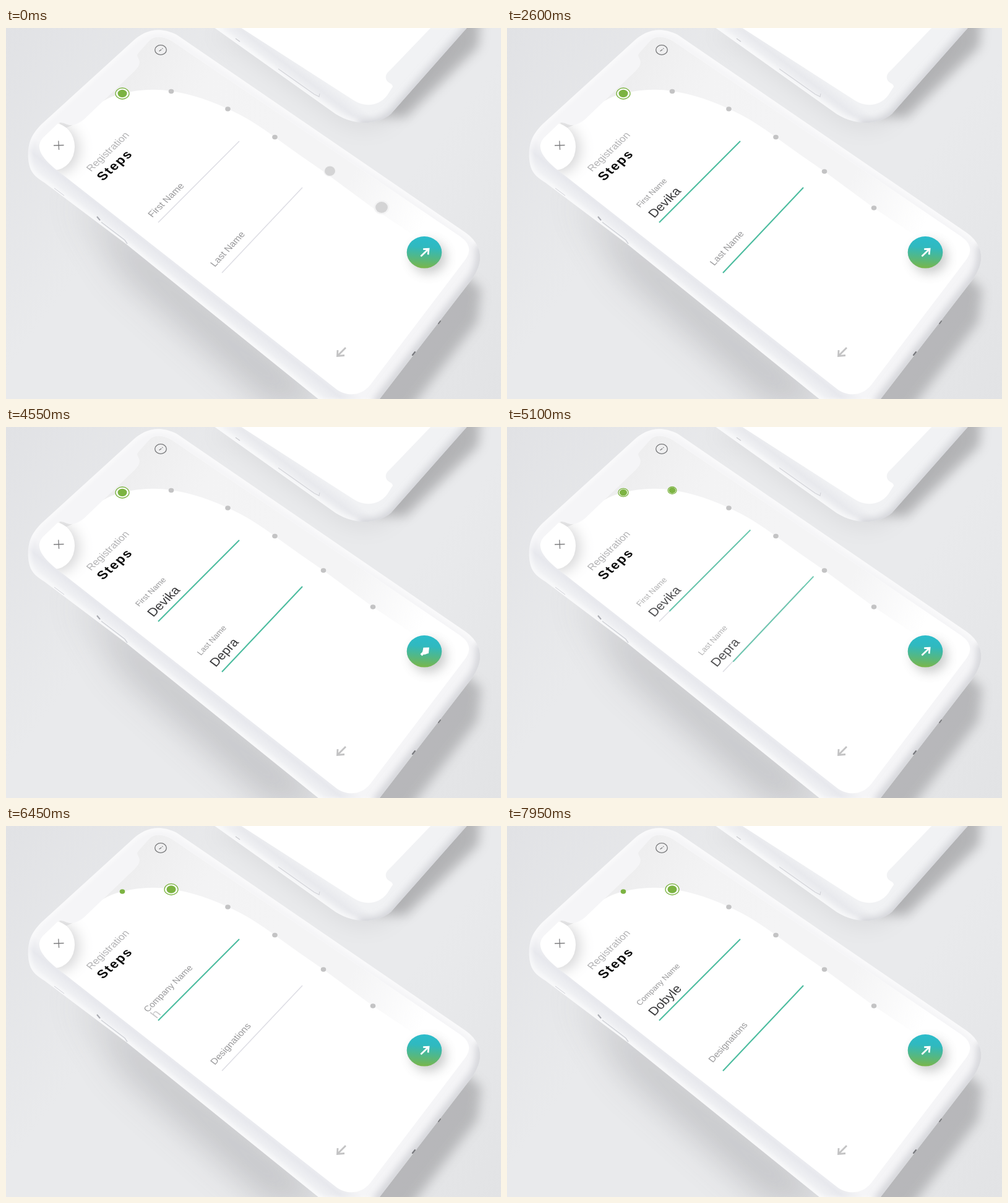
Write an HTML page with a canvas that moves like this. It is 800 px wide and 600 px high and loops after 8000 ms.

```html
<!DOCTYPE html>
<html lang="en">
<head>
<meta charset="utf-8">
<title>Registration steps</title>
<style>
html, body { margin: 0; width: 100%; height: 100%; overflow: hidden; background: #e6e7e9; }
canvas { display: block; }
</style>
</head>
<body>
<canvas id="stage" width="800" height="600"></canvas>
<script>
const LOOP = 8000, STEP = 50;
const GREEN = '#7cb342', TEAL = '#4bbd9f', GREY = '#c3c3c4';
const SANS = '"Liberation Sans", Arial, sans-serif';
const ctx = document.getElementById('stage').getContext('2d');

const clamp = x => Math.max(0, Math.min(1, x));
const ramp = (t, from, to) => clamp((t - from) / (to - from));
const ease = p => p * p * (3 - 2 * p);
const mix = (a, b, p) => a + (b - a) * p;

const body = new Path2D(`M36 212 C34 184 43 171 57 156 L203 23 C224 3 247 -3 276 11
  L737 327 C772 349 773 377 754 405 L600 605 L511 605 L195 350 L62 250 C47 240 38 234 36 212Z`);
const screen = new Path2D(`M214 40 L232 20 C240 12 255 13 268 21 L735 338 C750 348 752 362 742 375
  L588 578 C575 594 553 597 535 585 L85 232 C52 207 48 190 60 177 L83 155 C90 150 96 156 103 157
  C112 158 122 152 130 144 L205 72 C214 64 217 58 215 52 C213 47 210 44 214 40Z`);
const band = new Path2D(`M95 162 C125 155 140 116 188 106 C215 99 242 98 267 102 C300 107 332 118 359 131
  C386 143 411 159 435 177 C461 196 487 214 513 232 L593 291 L660 336 L740 338 L260 0 L60 130Z`);
const backBody = new Path2D(`M329 -6 L527 135 C556 157 596 160 622 139 L750 -6Z`);
const backScreen = new Path2D(`M371 -6 L562 117 C581 129 603 126 616 109 L625 95 C625 89 616 90 614 82
  C613 76 616 72 621 68 L692 -6Z`);

function gradient(c, x0, y0, x1, y1, ...colors) {
  const g = c.createLinearGradient(x0, y0, x1, y1);
  colors.forEach((col, i) => g.addColorStop(i / (colors.length - 1), col));
  return g;
}

// Paints only the blurred shadow of a path, filled or stroked.
function soft(c, path, color, blur, dx = 0, dy = 0, line = 0) {
  c.save();
  c.shadowColor = color;
  c.shadowBlur = blur;
  c.shadowOffsetX = 2000 + dx;
  c.shadowOffsetY = dy;
  c.translate(-2000, 0);
  c.lineWidth = line;
  line ? c.stroke(path) : c.fill(path);
  c.restore();
}

function stroke(c, points, color, width, cap = 'butt') {
  c.beginPath();
  points.forEach(([x, y]) => c.lineTo(x, y));
  c.strokeStyle = color;
  c.lineWidth = width;
  c.lineCap = cap;
  c.stroke();
}

function oval(c, x, y, rx, ry, color, line = 0) {
  c.beginPath();
  c.ellipse(x, y, rx, ry, 0, 0, 7);
  c.lineWidth = line;
  c[line ? 'strokeStyle' : 'fillStyle'] = color;
  line ? c.stroke() : c.fill();
}

// Lays the local axes on the tilted screen.
function lay(c, x, y, angle) {
  const a = angle * Math.PI / 180;
  c.transform(Math.cos(a), Math.sin(a), 0.8, 0.6, x, y);
}

function write(c, text, x, y, angle, font, color, spacing = '0px') {
  c.save();
  lay(c, x, y, angle);
  c.font = font + ' ' + SANS;
  c.letterSpacing = spacing;
  c.fillStyle = color;
  c.fillText(text, 0, 0);
  c.restore();
}

// Phone case with a soft dark flank on its lower right.
function shell(c, path, fill, flank) {
  c.save();
  c.fillStyle = fill;
  c.fill(path);
  c.clip(path);
  soft(c, path, 'rgba(255,255,255,.8)', 8, 0, 0, 6);
  soft(c, new Path2D(flank), 'rgba(178,180,188,.6)', 12, 0, 0, 13);
  c.restore();
}

function paintScene(c) {
  c.fillStyle = gradient(c, 0, 0, 800, 600, '#e1e2e5', '#e9eaec', '#e9eaec', '#e2e3e5');
  c.fillRect(0, 0, 800, 600);

  soft(c, new Path2D('M590 140 L645 145 L764 30 L768 -40 L700 -40Z'), 'rgba(120,120,122,.45)', 18);
  soft(c, backBody, 'rgba(120,120,124,.1)', 30, 0, 14);
  shell(c, backBody, gradient(c, 470, 95, 492, 66, '#f3f4f6', '#e8e9ed', '#f1f2f4'),
    'M570 156 C596 158 612 150 624 139 L752 -6');
  c.fillStyle = '#fff';
  c.fill(backScreen);
  stroke(c, [[371, 17], [378, 22]], '#c9cacf', 1.2);
  stroke(c, [[440, 66], [498, 107], [506, 111], [507, 106]], '#d3d4d9', 1.2);

  soft(c, new Path2D('M735 395 L768 422 L762 475 L650 620 L560 620Z'), 'rgba(120,120,122,.42)', 18);
  soft(c, new Path2D('M110 262 L195 330 L530 610 L430 610 L190 395Z'), 'rgba(110,112,118,.34)', 60);
  shell(c, body, gradient(c, 300, 434, 327, 400, '#f3f4f6', '#e7e8ed', '#f5f5f7'),
    'M766 350 C768 375 765 392 754 406 L598 608');
  stroke(c, [[78, 259], [94, 271]], '#d0d2d8', 1);
  stroke(c, [[147, 305], [152, 311]], '#a9abb1', 2);
  stroke(c, [[154, 314], [192, 343], [196, 349]], '#cfd1d7', 1.4);
  stroke(c, [[657, 529], [661, 524]], '#77787c', 2.2, 'round');
  stroke(c, [[699, 478], [702, 474]], '#77787c', 1.8, 'round');

  c.save();
  c.clip(screen);
  c.fillStyle = '#fff';
  c.fillRect(0, 0, 800, 600);
  c.fillStyle = gradient(c, 170, 80, 670, 330, '#ededee', '#f3f3f4', '#f4f4f5', '#f4f4f5', '#ffffff');
  c.fill(band);
  const knob = new Path2D();
  knob.ellipse(78, 192, 33, 38, 0, 0, 7);
  soft(c, knob, 'rgba(60,60,66,.22)', 22, 7, 4);
  c.fillStyle = '#fff';
  c.fill(knob);
  c.restore();

  stroke(c, [[77, 190], [93.5, 189.5]], '#7c7c7e', 1.3);
  stroke(c, [[84.8, 182.5], [85.6, 197]], '#7c7c7e', 1.3);
  oval(c, 250, 35.5, 9.3, 7.8, '#77787a', 1.3);
  stroke(c, [[247.5, 37.5], [251.3, 34.7]], '#77787a', 1.3);
  oval(c, 252.8, 33.3, 0.8, 0.8, '#77787a');

  write(c, 'Registration', 137.5, 233, -43.5, '16.2px', '#b2b2b4');
  write(c, 'Steps', 156.5, 248, -41.5, 'bold 21px', '#0b0b0b', '1.8px');

  stroke(c, [[549, 517], [536, 530]], GREY, 2.8);
  stroke(c, [[536, 521], [535.5, 530.5], [547, 529.5]], GREY, 2.8);

  const button = new Path2D();
  button.ellipse(676, 362.8, 28.3, 25.8, 0, 0, 7);
  soft(c, button, 'rgba(80,84,84,.3)', 18, 7, 8);
  c.fillStyle = gradient(c, 678, 337, 674, 389, '#2bbccb', '#30b9bf', '#53b885', '#7bb648');
  c.fill(button);
}

const scene = document.createElement('canvas');
scene.width = 800;
scene.height = 600;
paintScene(scene.getContext('2d'));

const rows = [
  { from: [246, 314.5], to: [377, 183], rest: [236.5, 307], up: [215, 291], value: [238, 308], angle: -44.5 },
  { from: [349, 396], to: [479, 258], rest: [337.5, 387], up: [315, 370], value: [339, 389], angle: -47 }
];
// on: focus time, type: first and last moment of typing
const forms = [
  { show: -400, hide: 4950, fields: [
    { label: 'First Name', value: 'Devika', ghost: 'HVTKRB', on: 450, type: [400, 1250] },
    { label: 'Last Name', value: 'Depra', ghost: 'RSBEK', on: 2600, type: [3150, 3700] }] },
  { show: 5550, hide: 1e9, fields: [
    { label: 'Company Name', value: 'Dobyle', ghost: 'hiuafy', on: 6350, type: [6400, 7500] },
    { label: 'Designations', value: '', ghost: '', on: 7900, type: [9000, 9500] }] }
];

function typeValue(field, row, t, alpha) {
  const done = ramp(t, ...field.type) * field.value.length;
  ctx.save();
  lay(ctx, ...row.value, row.angle);
  ctx.font = '20.4px ' + SANS;
  ctx.fillStyle = '#38383a';
  [...field.value].forEach((ch, i) => {
    const a = clamp(done - i);
    if (!a) return;
    const x = ctx.measureText(field.value.slice(0, i)).width;
    ctx.globalAlpha = alpha * a;
    ctx.fillText(a < 0.65 ? field.ghost[i] : ch, x, (1 - a) * 9);
  });
  ctx.restore();
}

function drawField(field, row, form, t) {
  const out = ramp(t, form.hide, form.hide + 700);
  const shown = ramp(t, form.show, form.show + 350);
  const alpha = shown * (1 - ease(out));
  if (alpha <= 0) return;

  if (t >= field.on) {
    const slide = ease(ramp(t, form.hide, form.hide + 550));
    const shift = slide * 90;
    ctx.globalAlpha = 1 - slide;
    stroke(ctx, [row.from, row.to].map(([x, y]) => [x + shift, y - shift]), TEAL, 2);
  }
  const p = ramp(t, field.on - 50, field.on + 400);
  const enter = (1 - ease(shown)) * 8;
  ctx.globalAlpha = alpha * (1 - out * 0.6);
  write(ctx, field.label,
    mix(row.rest[0], row.up[0], p) + enter, mix(row.rest[1], row.up[1], p) - enter,
    row.angle, mix(15, 12.7, p) + 'px', '#98989a');
  typeValue(field, row, t, alpha);
  ctx.globalAlpha = 1;
}

const stops = [[188, 106], [267, 102.5], [358.5, 131], [434.5, 176.5], [513, 232], [593, 291]];

function drawStops(t) {
  const move = ease(ramp(t, 4900, 5350));
  const settle = 1 - ramp(t, 0, 150);
  stops.forEach(([x, y], i) => {
    const grow = i === 0 ? 1 - move : i === 1 ? move : 0;
    const big = i > 3 ? settle * (i === 4 ? 0.75 : 1) : 0;
    const cx = x + big * 14, cy = y - big;
    if (big) oval(ctx, cx, cy, 4.4 + 8 * big, 3.8 + 7.4 * big, '#f3f3f4');
    if (grow) {
      oval(ctx, cx, cy, 4 + 7 * grow, 3.4 + 5.6 * grow, '#fff');
      oval(ctx, cx, cy, 4 + 7 * grow, 3.4 + 5.6 * grow, GREEN, 1.3);
    }
    const color = i === 0 || grow > 0 ? GREEN : big ? '#d4d4d5' : GREY;
    oval(ctx, cx, cy, 4.3 + 3.2 * grow + 5.6 * big, 3.7 + 2.5 * grow + 5.3 * big, color);
  });
}

function drawArrow(t) {
  const press = t >= 4550 ? 1 - ramp(t, 4550, 4800) : 0;
  const size = 0.94 - 0.08 * press;
  ctx.save();
  ctx.translate(677, 363.2);
  ctx.scale(size, size);
  stroke(ctx, [[-7, 6.5], [5.5, -5.5]], '#fff', 2.9 + 2 * press);
  const head = [[-3, -6], [6.5, -6.3], [5.5, 3.5]];
  stroke(ctx, head, '#fff', 2.9);
  if (press) {
    ctx.globalAlpha = press;
    ctx.fillStyle = '#fff';
    ctx.beginPath();
    [...head, [-1, 6], [-5, 2]].forEach(([x, y]) => ctx.lineTo(x, y));
    ctx.fill();
  }
  ctx.restore();
}

function draw(now) {
  const t = Math.floor((now % LOOP) / STEP) * STEP;
  ctx.drawImage(scene, 0, 0);
  rows.forEach(row => stroke(ctx, [row.from, row.to], '#dddde4', 1.5));
  forms.forEach(form => form.fields.forEach((field, i) => drawField(field, rows[i], form, t)));
  drawStops(t);
  drawArrow(t);
}

const start = performance.now();
function tick() {
  draw(performance.now() - start);
  requestAnimationFrame(tick);
}
tick();
</script>
</body>
</html>
```
